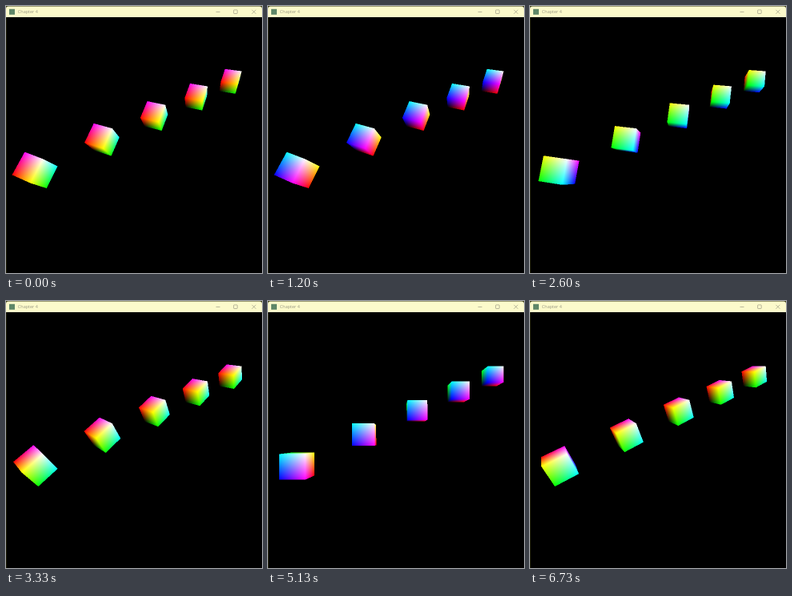
An HTML page with a canvas that plays this animation: 320x334 px, repeating every 6.8 s.

```html
<!DOCTYPE html>
<html lang="en">
<head>
<meta charset="utf-8">
<title>Chapter 4</title>
<style>
  html, body { margin: 0; width: 100%; height: 100%; overflow: hidden; background: #000; }
  canvas, svg { position: absolute; left: 0; top: 0; width: 320px; height: 334px; display: block; }
  text { font: 5.5px "Open Sans", "Noto Sans", sans-serif; fill: #9c9a84; }
</style>
</head>
<body>
<canvas id="stage" width="320" height="334"></canvas>
<svg viewBox="0 0 320 334">
  <rect width="1" height="334" fill="#1c1c08"/>
  <rect width="320" height="14" fill="#3a3a14"/>
  <path d="M0 14V3.5Q0 .6 3 .6H317Q320 .6 320 3.5V14Z" fill="#fcfacb"/>
  <rect x="4" y="3.8" width="7" height="7" fill="#5f8768"/>
  <text x="14.8" y="9.4">Chapter 4</text>
  <g fill="none" stroke="#9c9a84" stroke-width=".7">
    <path d="M262.5 7.4h5M307.4 4.8l5 5m0-5l-5 5"/>
    <rect x="284.6" y="4.9" width="4.6" height="4.6" rx=".6"/>
  </g>
</svg>
<script>
const LOOP = 6800, STEPS = 102;
const FOCAL = 277, CX = 160, CY = 174;
const FIRST = [-8.06, -2.08, -18.2], GAP = [5.115, 2.57, -2.59];
const START = 207, SPEED = 100; // degrees, degrees per second
const SUB = [0.25, 0.75];

const ctx = document.getElementById('stage').getContext('2d');
const cubes = [0, 1, 2, 3, 4].map(i => FIRST.map((v, k) => v + i * GAP[k]));

// Rotation about the (1,1,1) diagonal is a circulant matrix.
function diagonalRotation(angle) {
  const c = Math.cos(angle), s = Math.sin(angle) / Math.sqrt(3);
  const a = (1 + 2 * c) / 3, b = (1 - c) / 3 - s, d = (1 - c) / 3 + s;
  return ([x, y, z]) => [a * x + b * y + d * z, d * x + a * y + b * z, b * x + d * y + a * z];
}

// Nearest hit of a ray with the cube from -1 to 1, or null.
function hitCube(o, d) {
  let near = 0, far = Infinity;
  for (let k = 0; k < 3; k++) {
    const t1 = (-1 - o[k]) / d[k], t2 = (1 - o[k]) / d[k];
    near = Math.max(near, Math.min(t1, t2));
    far = Math.min(far, Math.max(t1, t2));
  }
  return near < far ? near : null;
}

function drawCube(center, toBody) {
  const scale = FOCAL / -center[2];
  const size = Math.ceil(scale * 2.2);
  const left = Math.round(CX + center[0] * scale) - size;
  const top = Math.round(CY - center[1] * scale) - size;
  const image = ctx.getImageData(left, top, 2 * size, 2 * size);
  const eye = toBody(center.map(v => -v));
  for (let y = 0, n = 0; y < 2 * size; y++) {
    for (let x = 0; x < 2 * size; x++, n += 4) {
      const sum = [0, 0, 0];
      let hits = 0;
      for (const sy of SUB) for (const sx of SUB) {
        const ray = toBody([(left + x + sx - CX) / FOCAL, (CY - top - y - sy) / FOCAL, -1]);
        const t = hitCube(eye, ray);
        if (t === null) continue;
        hits++;
        for (let k = 0; k < 3; k++) sum[k] += (eye[k] + t * ray[k] + 1) / 2;
      }
      if (hits) for (let k = 0; k < 3; k++) image.data[n + k] = sum[k] * 255 / 4;
    }
  }
  ctx.putImageData(image, left, top);
}

function draw(step) {
  const degrees = START + SPEED * step * LOOP / STEPS / 1000;
  const toBody = diagonalRotation(-degrees * Math.PI / 180);
  ctx.fillStyle = '#000';
  ctx.fillRect(0, 0, 320, 334);
  cubes.forEach(center => drawCube(center, toBody));
}

// Step starts are rounded to hundredths of a second.
function stepAt(ms) {
  const t = Math.floor((ms % LOOP) / 10) * 10;
  return Math.floor((t + 3.4) * STEPS / LOOP) % STEPS;
}

let start = null, shown = 0;
function tick(now) {
  if (start === null) start = now;
  const step = stepAt(Math.max(0, now - start));
  if (step !== shown) draw(shown = step);
  requestAnimationFrame(tick);
}
draw(0);
requestAnimationFrame(tick);
</script>
</body>
</html>
```
